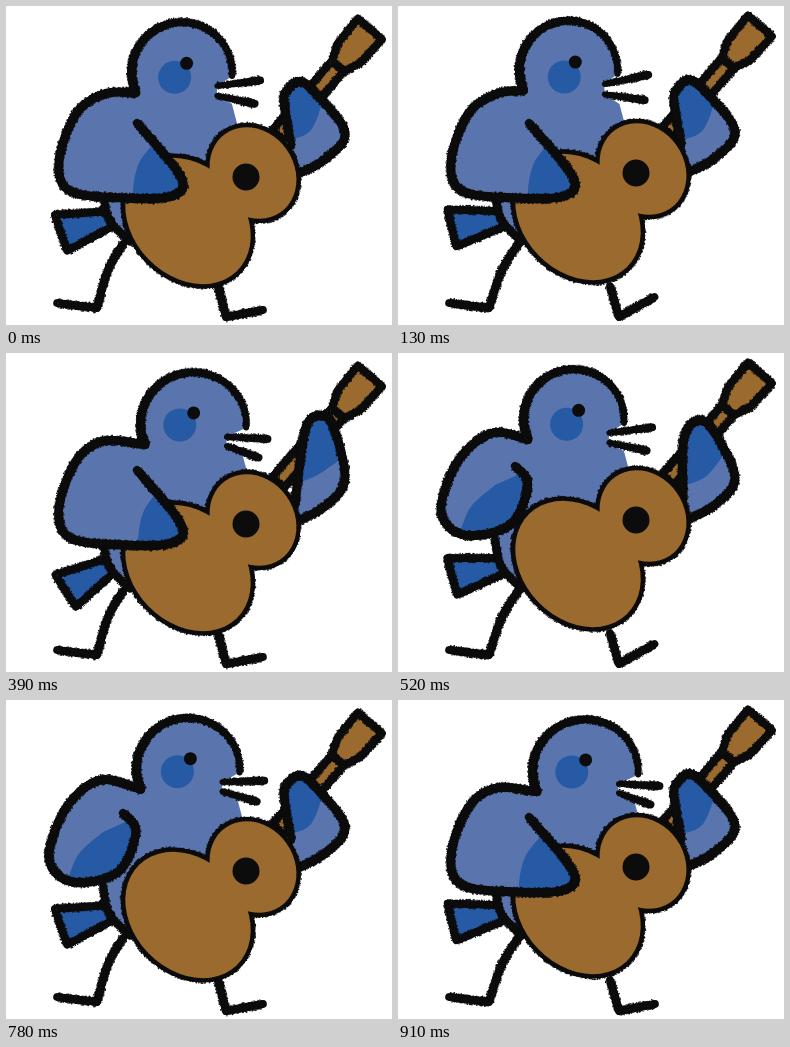
Animation, 386 px wide and 319 px high, one loop 1.04 s. Source, as an HTML page with a canvas:

```html
<!DOCTYPE html>
<html lang="en">
<head>
<meta charset="utf-8">
<title>Bird with guitar</title>
<style>
  html, body { margin: 0; width: 100%; height: 100%; overflow: hidden; background: #fff; }
  canvas { display: block; width: 386px; height: 319px; }
</style>
</head>
<body>
<canvas id="stage" width="386" height="319"></canvas>
<script>
const ctx = document.getElementById('stage').getContext('2d');
const STEP = 130, STEPS = 8;
const BLUE = '#5a74ad', DEEP = '#265aa5', WOOD = '#9a6a2f', INK = '#0c0c0c';

// Key points of the strumming wing: resting on the strings, half raised, thrown back
const WINGS = [
  [[98,88],[70,108],[53,155],[64,185],[118,192],[166,190],[175,171],[131,117]],
  [[94,80],[60,108],[43,158],[66,182],[112,172],[130,132],[117,113]],
  [[66,87],[20,76],[9,100],[45,158],[94,181],[102,212],[124,235]]
];

let seed = 1, dry = false;
function rand() {
  seed = (seed * 16807) % 2147483647;
  return seed / 2147483647;
}

// Catmull-Rom curve through a few points
function smooth(pts) {
  const out = [], at = i => pts[Math.max(0, Math.min(pts.length - 1, i))];
  for (let i = 0; i < pts.length - 1; i++) {
    const [a, b, c, d] = [at(i - 1), at(i), at(i + 1), at(i + 2)];
    for (let t = 0; t < 1; t += 1 / 8) {
      out.push([0, 1].map(j => b[j] + 0.5 * t * (c[j] - a[j] +
        t * (2 * a[j] - 5 * b[j] + 4 * c[j] - d[j] + t * (3 * (b[j] - c[j]) + d[j] - a[j])))));
    }
  }
  return [...out, at(pts.length)];
}

// Maps local points to the stage: turned, then moved
function place(pts, x, y, angle) {
  const c = Math.cos(angle), s = Math.sin(angle);
  return pts.map(([u, v]) => [x + u * c - v * s, y + u * s + v * c]);
}

function arc(x, y, rx, ry, tilt = 0, from = 0, to = 2 * Math.PI) {
  const pts = Array.from({ length: 49 }, (_, i) => {
    const a = from + (to - from) * i / 48;
    return [rx * Math.cos(a), ry * Math.sin(a)];
  });
  return place(pts, x, y, tilt);
}

function ray([x, y], length, angle) {
  return place([[0, 0], [length, 0]], x, y, angle);
}

function trace(pts) {
  ctx.beginPath();
  pts.forEach(([x, y]) => ctx.lineTo(x, y));
}

function fill(pts, color) {
  trace(pts);
  ctx.fillStyle = color;
  ctx.fill();
}

function dot(x, y, r, color) {
  ctx.beginPath();
  ctx.arc(x, y, r, 0, 7);
  ctx.fillStyle = color;
  ctx.fill();
}

// Crayon line: solid core, ragged edge, optional dry grain and taper
function ink(pts, width, endWidth = width) {
  ctx.strokeStyle = INK;
  ctx.lineCap = 'round';
  for (let i = 1; i < pts.length; i++) {
    const [x, y] = pts[i - 1], dx = pts[i][0] - x, dy = pts[i][1] - y;
    const len = Math.hypot(dx, dy) || 1;
    const pieces = Math.ceil(len / 1.2);
    for (let k = 0; k < pieces; k++) {
      const f = k / pieces, px = x + dx * f, py = y + dy * f;
      const w = width + (endWidth - width) * (i - 1 + f) / (pts.length - 1);
      const dab = (off, r, color) => dot(px - dy / len * off, py + dx / len * off, r, color);
      ctx.lineWidth = w - 0.8;
      ctx.beginPath();
      ctx.moveTo(px, py);
      ctx.lineTo(x + dx * (k + 1) / pieces, y + dy * (k + 1) / pieces);
      ctx.stroke();
      for (const side of [-1, 1]) {
        dab(side * (w / 2 - 1 + rand() * 1.6), 0.4 + rand() * 0.6, INK);
      }
      if (dry && rand() < 0.5) dab((rand() - 0.5) * w, 0.6, 'rgba(90,105,140,.4)');
    }
  }
}

function shape(pts, color, width) {
  fill(pts, color);
  ink([...pts, pts[0]], width);
}

// Wing with a darker tip
function limb(line, tip) {
  fill(line, BLUE);
  ctx.save();
  trace(line);
  ctx.clip();
  fill(tip, DEEP);
  ctx.restore();
  ink(line, 9);
}

function drawTail(boil, raise) {
  const tilt = 0.28 - 0.1 * boil + 0.24 * raise ** 3;
  shape(place([[-51, -19], [0, -8], [2, 8], [-49, 19]], 103, 213, -tilt), DEEP, 8);
}

function drawLegs(boil, tapping) {
  const ankle = [91, 302], heel = [220 + boil, 311];
  const toe = tapping ? [257, 304] : [263 - 6.5 * boil, 293 - 2 * boil];
  ink(smooth([[117 + 4 * boil, 238 - boil], [102 + 2 * boil, 264], ankle]), 8.5);
  ink([ankle, [51, 297]], 8.5);
  ink([[212, 280], heel], 8.5);
  ink([heel, toe], 8.5);
}

function drawNeck(x, y) {
  const angle = -0.86;
  shape(place([[-92, -8], [0, -8], [0, 8], [-92, 8]], x, y, angle), WOOD, 8);
  shape(place([[0, -8], [17, -15], [49, -16], [49, 16], [17, 15], [0, 8]], x, y, angle), WOOD, 8);
}

// Two overlapping bouts, filled after inking so that only the outer contour stays
function drawGuitar(dx, dy) {
  const bouts = [
    arc(180 + dx, 211 + dy, 70, 55, 0.8),
    arc(245 + dx, 163 + dy, 48, 41, 0.96)
  ];
  bouts.forEach(bout => ink(bout, 9));
  bouts.forEach(bout => fill(bout, WOOD));
  dot(238 + dx, 167 + dy, 13.5, INK);
}

function drawGrip(raise, dx, dy) {
  const x = 290 + 20 * raise + dx, y = 74 - 13 * raise + dy;
  const line = smooth([[283 + 4 * raise + dx, 140 + 12 * raise], [276 + 17 * raise + dx, 96 + 4 * raise],
    [x - 11, y + 9], [x, y], [x + 14, y + 8], [337 + dx, 124 + dy], [318 + dx, 151 + dy], [289 + dx, 167 + dy]]);
  const edge = smooth([[270, 138], [284 + 6 * raise, 134 - 3 * raise],
    [305 + 8 * raise, 124 - 3 * raise], [318 + 22 * raise, 92 + 10 * raise]]);
  limb(line, [...edge, [345, 50], [260, 50]]);
}

function drawStrum(step, lift, shoulder) {
  const settled = 120 + 12 * (1 - 0.5 ** ((step + 1) % STEPS));
  const tips = [
    [[settled, 200], [settled + 2, 175], [settled + 8, 155], [settled + 22, 137], [190, 120], [190, 200]],
    [[60, 186], [72, 155], [97, 132], [135, 115], [145, 190]],
    [[70, 85], [52, 120], [53, 172], [0, 170], [0, 60]]
  ];
  const tip = tips[lift];
  limb(smooth([shoulder, ...WINGS[lift]]), [...smooth(tip.slice(0, -2)), ...tip.slice(-2)]);
}

function draw(step) {
  const boil = step % 3;
  const dx = boil ? 0 : 2, dy = boil ? 0 : 3;
  const lean = 0.5 - 0.5 * Math.sin(step * Math.PI / 2 + 0.35);
  const raise = step < 3 ? 0 : Math.max(0, 1 - (step - 3) / 2);
  const lift = Math.max(0, 2 - Math.abs(step - 5));
  const tapping = boil === 0 || step === STEPS - 1;
  seed = 77777 + boil * 101300;
  dry = boil === 0;

  const head = arc(170 + 18 * lean, 64 + 7 * lean, 49 + 4 * lean, 49.5 + 2 * lean, 0, 2.72, 6.36);
  const bx = 206 + 15 * lean, by = 78 + 6 * lean;

  ctx.fillStyle = '#fff';
  ctx.fillRect(0, 0, 386, 319);
  drawTail(boil, raise);
  drawLegs(boil, tapping);
  fill([...head, [bx, by], [bx, by + 10], [bx + 15, 98], [bx + 20, 117], [222, 145],
    [150, 230], [124, 236], [104, 215], [97, 190], [100, 110]], BLUE);

  if (lift < 2) ink(smooth([[97, 186], [103, 213], [124, 236]]), 8);
  if (lift) drawStrum(step, lift, head[0]);
  drawNeck(330 + dx, 57 + dy);
  drawGrip(raise, dx, dy / 2);
  drawGuitar(dx, dy + dy / 3);

  dot(166 + 8 * lean, 71 + lean, 16.5, DEEP);
  dot(177 + 11 * lean, 56 + 4 * lean, 6.5, INK);
  ink(head, 9.5, 6.5);
  ink(ray([bx, by], 45 - 4 * lean, -0.22 + 0.28 * lean), 6, 8.5);
  ink(ray([bx, by + 10 - lean], 41 - 7 * lean, 0.14 + 0.22 * lean), 6, 8.5);
  if (!lift) drawStrum(step, lift, head[0]);
}

let shown = -1;
function tick(now) {
  const step = Math.floor(now / STEP) % STEPS;
  if (step !== shown) draw(shown = step);
  requestAnimationFrame(tick);
}
draw(shown = 0);
requestAnimationFrame(tick);
</script>
</body>
</html>
```
